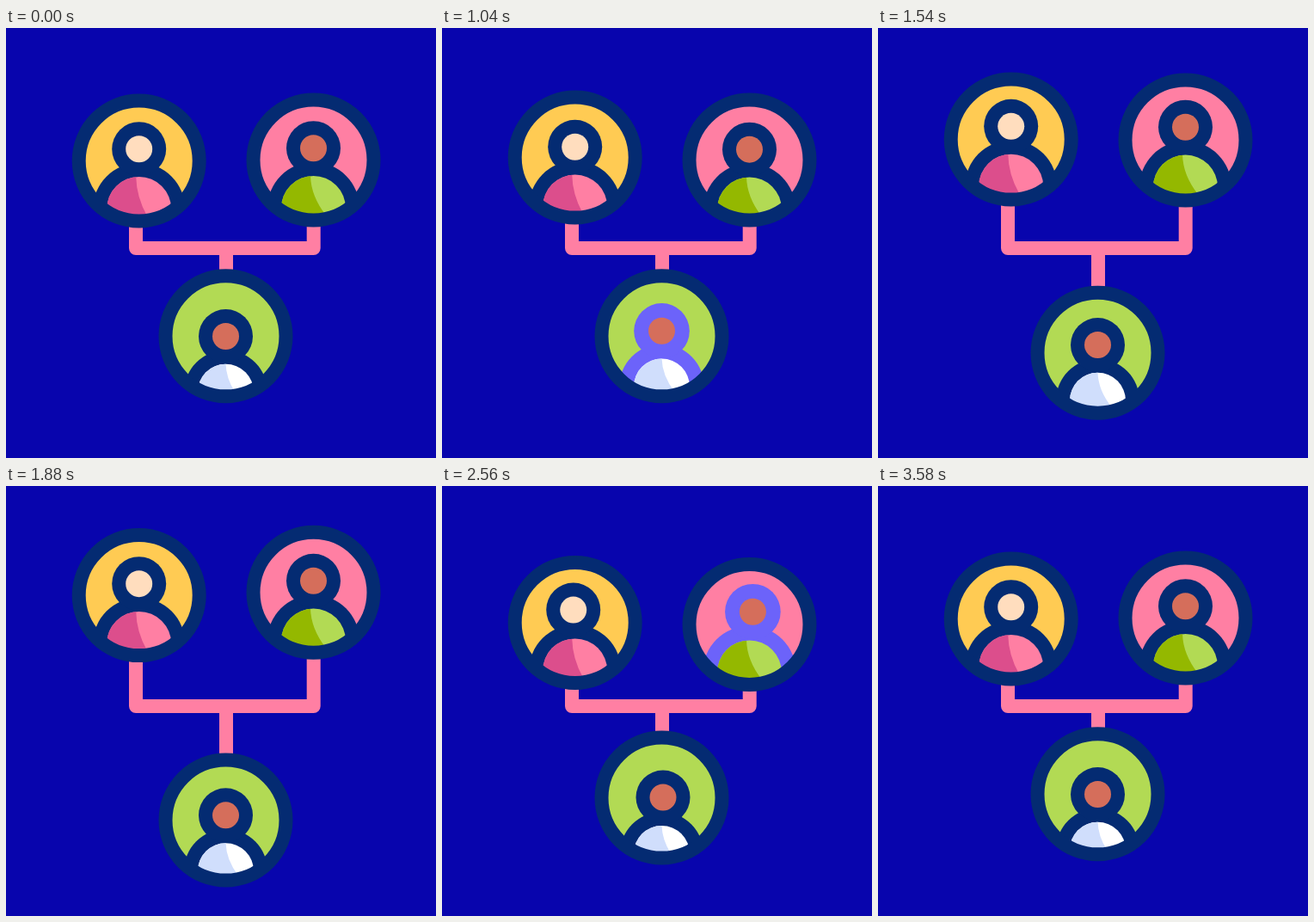
Recreate the animation shown at these times as an HTML page with a canvas. Size 500x500 px, loop 3600 ms.

```html
<!DOCTYPE html>
<html lang="en">
<head>
<meta charset="utf-8">
<title>Team chart</title>
<style>
html, body { margin: 0; width: 100%; height: 100%; overflow: hidden; background: #0805ad; }
canvas { display: block; width: 500px; height: 500px; }
</style>
</head>
<body>
<canvas id="stage" width="500" height="500"></canvas>
<script>
const ctx = document.getElementById('stage').getContext('2d');
const LOOP = 3600, SETTLE = 180;
const BACKDROP = '#0805ad', NAVY = '#042b72', PINK = '#ff7fa3', LIME = '#b2da54', VIOLET = '#6c63fa';
const INNER = 62, STROKE = 16, HEAD = 15.5;

// lift moves the whole badge, bob and sway move the person inside it,
// and flashes are the spans in which the person's outline turns violet.
const left = {
  x: 154.7, y: 154.5, shirtTop: 18.5, dome: 37.5, fold: -3.5, lean: 13,
  back: '#ffcb53', skin: '#ffddbe', shirt: PINK, shade: '#dc4e8c',
  lift: { start: 980, peak: 1820, low: 2520, reach: -28, bounce: 5 },
  bob: { from: 820, to: 2360, size: 1.5, waves: 3 },
  sway: { from: 2000, to: 3240, size: -2, waves: 1 },
  flashes: [{ from: 2000, to: 2400 }]
};
const right = {
  x: 357.5, y: 153.5, shirtTop: 18.5, dome: 37.5, fold: -3.5, lean: 18,
  back: PINK, skin: '#d56e5b', shirt: LIME, shade: '#94b800',
  lift: { start: 1090, peak: 1960, low: 2570, reach: -30, bounce: 7.5 },
  bob: { from: 820, to: 2360, size: 1.5, waves: 3 },
  sway: { from: 2060, to: 2940, size: 4, waves: 1 },
  flashes: [{ from: 2060, to: 2780 }]
};
const bottom = {
  x: 255.5, y: 358.3, shirtTop: 32.5, dome: 32.5, fold: 0, lean: 16,
  back: LIME, skin: '#d56e5b', shirt: '#ffffff', shade: '#d0defc',
  lift: { start: 1180, peak: 2230, low: 2660, reach: 34, bounce: 0 },
  bob: { from: 700, to: 2200, size: -9.5, waves: 1 },
  sway: { from: 2300, to: 3300, size: 1.5, waves: 2 },
  flashes: [{ from: 800, to: 1300 }, { from: 2780, to: 3300 }]
};

const progress = (t, from, to) => Math.min(1, Math.max(0, (t - from) / (to - from)));
const easeOut = u => u * (2 - u);
const easeInOut = u => (1 - Math.cos(Math.PI * u)) / 2;
const wave = (t, { from, to, size, waves }) => size * Math.sin(Math.PI * waves * progress(t, from, to));

// Glide out to the reach, swing back slightly past rest, then settle.
function glide(t, { start, peak, low, reach, bounce }) {
  return reach * easeOut(progress(t, start, peak))
    + (bounce - reach) * easeInOut(progress(t, peak, low))
    - bounce * easeInOut(progress(t, low, low + SETTLE));
}

const centerY = (p, t) => p.y + glide(t, p.lift);

function circle(x, y, r) {
  ctx.beginPath();
  ctx.arc(x, y, r, 0, Math.PI * 2);
}

function disc(x, y, r, color) {
  circle(x, y, r);
  ctx.fillStyle = color;
  ctx.fill();
}

function drawConnector(t) {
  ctx.strokeStyle = PINK;
  ctx.lineWidth = STROKE;
  ctx.lineJoin = 'round';
  ctx.beginPath();
  ctx.moveTo(151, centerY(left, t));
  ctx.lineTo(151, 256);
  ctx.lineTo(357.7, 256);
  ctx.lineTo(357.7, centerY(right, t));
  ctx.moveTo(256, 256);
  ctx.lineTo(256, centerY(bottom, t));
  ctx.stroke();
}

function drawShirt(p, top) {
  const { x, dome } = p;
  const depth = dome * 1.22, fold = x + p.fold;
  disc(x, top + dome, dome, p.shirt);
  ctx.save();
  circle(x, top + dome, dome);
  ctx.clip();
  ctx.fillStyle = p.shade;
  ctx.beginPath();
  ctx.moveTo(x - dome, top - 2);
  ctx.lineTo(fold, top - 2);
  ctx.quadraticCurveTo(fold, top + depth / 2, fold + p.lean, top + depth);
  ctx.lineTo(x - dome, top + depth);
  ctx.fill();
  ctx.restore();
}

function drawBadge(p, t) {
  const { x } = p, y = centerY(p, t);
  const top = y + p.shirtTop + wave(t, p.bob);
  const sway = wave(t, p.sway);
  const headX = x + sway;
  const headY = top - 32.3 - Math.min(1, Math.abs(sway) / 2);
  const lit = p.flashes.some(f => t >= f.from && t < f.to);
  const outline = lit ? VIOLET : NAVY;
  const border = STROKE + (lit ? 0.8 : 0);

  disc(x, y, INNER + 2, p.back);
  ctx.save();
  circle(x, y, INNER + 2);
  ctx.clip();
  disc(x, top + p.dome, p.dome + border, outline);
  disc(headX, headY, HEAD + border, outline);
  disc(headX, headY, HEAD, p.skin);
  drawShirt(p, top);
  ctx.restore();

  circle(x, y, INNER + STROKE / 2);
  ctx.strokeStyle = NAVY;
  ctx.lineWidth = STROKE;
  ctx.stroke();
}

function frame(now) {
  const t = now % LOOP;
  ctx.fillStyle = BACKDROP;
  ctx.fillRect(0, 0, 500, 500);
  drawConnector(t);
  [left, right, bottom].forEach(p => drawBadge(p, t));
  requestAnimationFrame(() => frame(performance.now()));
}
frame(0);
</script>
</body>
</html>
```
